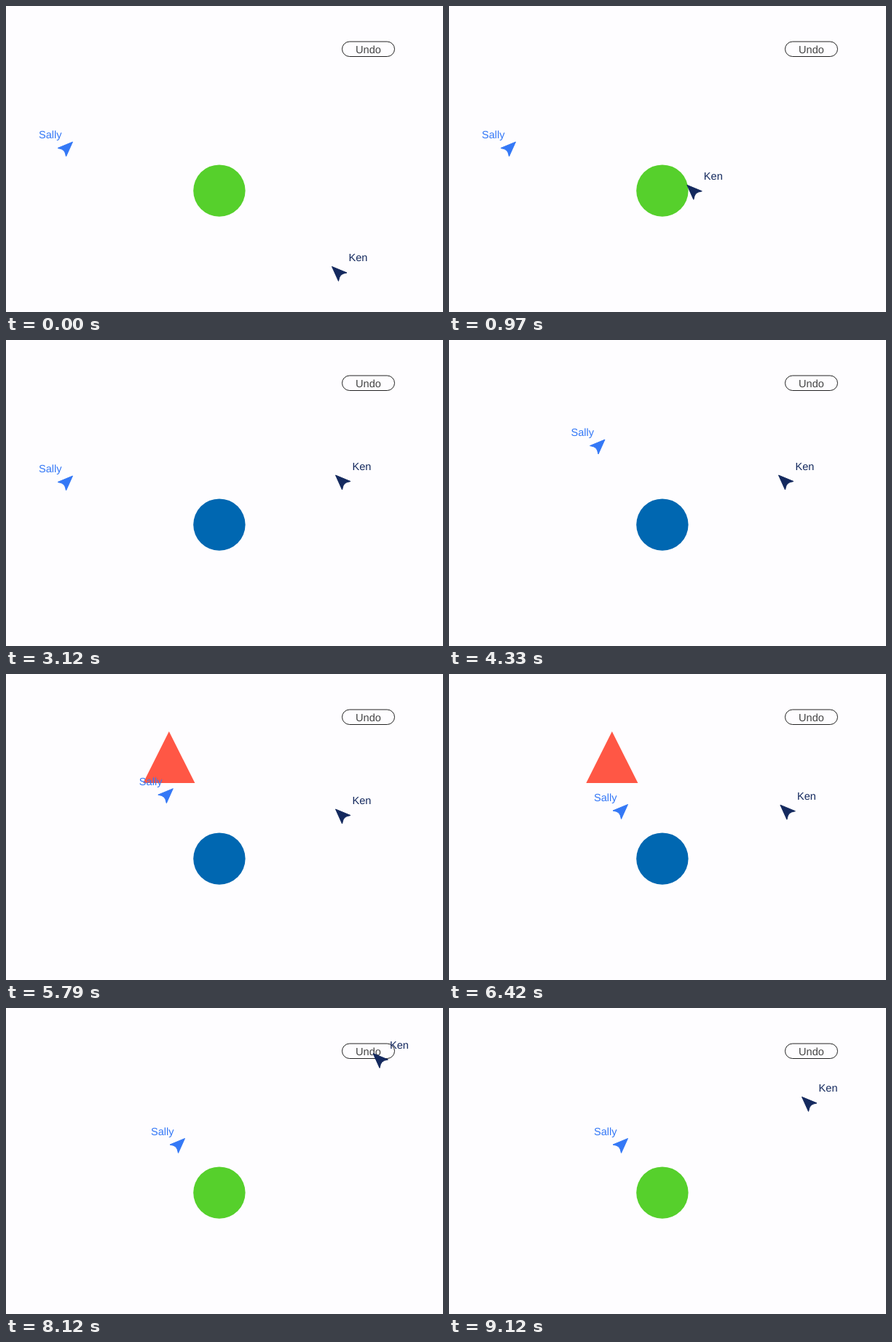
Write an HTML page that moves like this. It is 600x421 px and loops after 9180 ms.

```html
<!DOCTYPE html>
<html lang="en">
<head>
<meta charset="utf-8">
<title>Shared undo</title>
<style>
  html, body { margin: 0; width: 100%; height: 100%; overflow: hidden; background: #fefdff; }
  svg { display: block; }
  text { font: 14.6px "Liberation Sans", Arial, sans-serif; text-rendering: geometricPrecision; }
  use { stroke-width: 1; stroke-linejoin: round; }
  #sally { fill: #3478f6; stroke: #3478f6; }
  #ken { fill: #14295e; stroke: #14295e; }
  g text { stroke: none; }
</style>
</head>
<body>
<svg width="600" height="421" viewBox="0 0 600 421">
  <defs><path id="arrow" d="M.5 .5 21 9Q15 10 12.8 12.2T9.5 20.5Z"/></defs>
  <circle id="dot" cx="292.9" cy="254.1" r="35.7"/>
  <path id="triangle" d="M223.8 79 259.4 150H188.3Z" fill="#ff5745"/>
  <rect x="461.5" y="49" width="72" height="20.5" rx="10.25" fill="none" stroke="#222"/>
  <text x="497.5" y="64.5" text-anchor="middle" fill="#444">Undo</text>
  <g id="sally"><use href="#arrow" transform="scale(-1 1)"/><text x="-47" y="-4.5">Sally</text></g>
  <g id="ken"><use href="#arrow"/><text x="23.5" y="-6.5">Ken</text></g>
</svg>
<script>
const LOOP = 9180, MOVE = 1000;
const RECOLOUR = 1550, ADD_TRIANGLE = 4790, UNDO = 7750;

const [dot, triangle, sally, ken] =
  ["dot", "triangle", "sally", "ken"].map(id => document.getElementById(id));

function ease(u) {
  u = Math.min(1, Math.max(0, u));
  return u * u * (3 - 2 * u);
}

// Moves a pointer from its home to each stop, given as start time and tip position.
function place(pointer, t, [x, y], ...stops) {
  for (const [start, toX, toY] of stops) {
    const k = ease((t - start) / MOVE);
    x += (toX - x) * k;
    y += (toY - y) * k;
  }
  pointer.setAttribute("transform", `translate(${x} ${y})`);
}

function draw(t) {
  place(sally, t, [92, 186.5], [3260, 214.5, 136.5], [5300, 246, 179]);
  place(ken, t, [447, 358], [0, 326, 245.5], [2120, 452, 185.5], [6290, 503.5, 62], [8150, 484, 122]);

  const undone = t >= UNDO;
  dot.setAttribute("fill", t >= RECOLOUR && !undone ? "#0067b1" : "#56d02c");
  triangle.style.display = t >= ADD_TRIANGLE && !undone ? "" : "none";
}

const begin = performance.now();
function tick() {
  draw((performance.now() - begin) % LOOP);
  requestAnimationFrame(tick);
}
tick();
</script>
</body>
</html>
```
